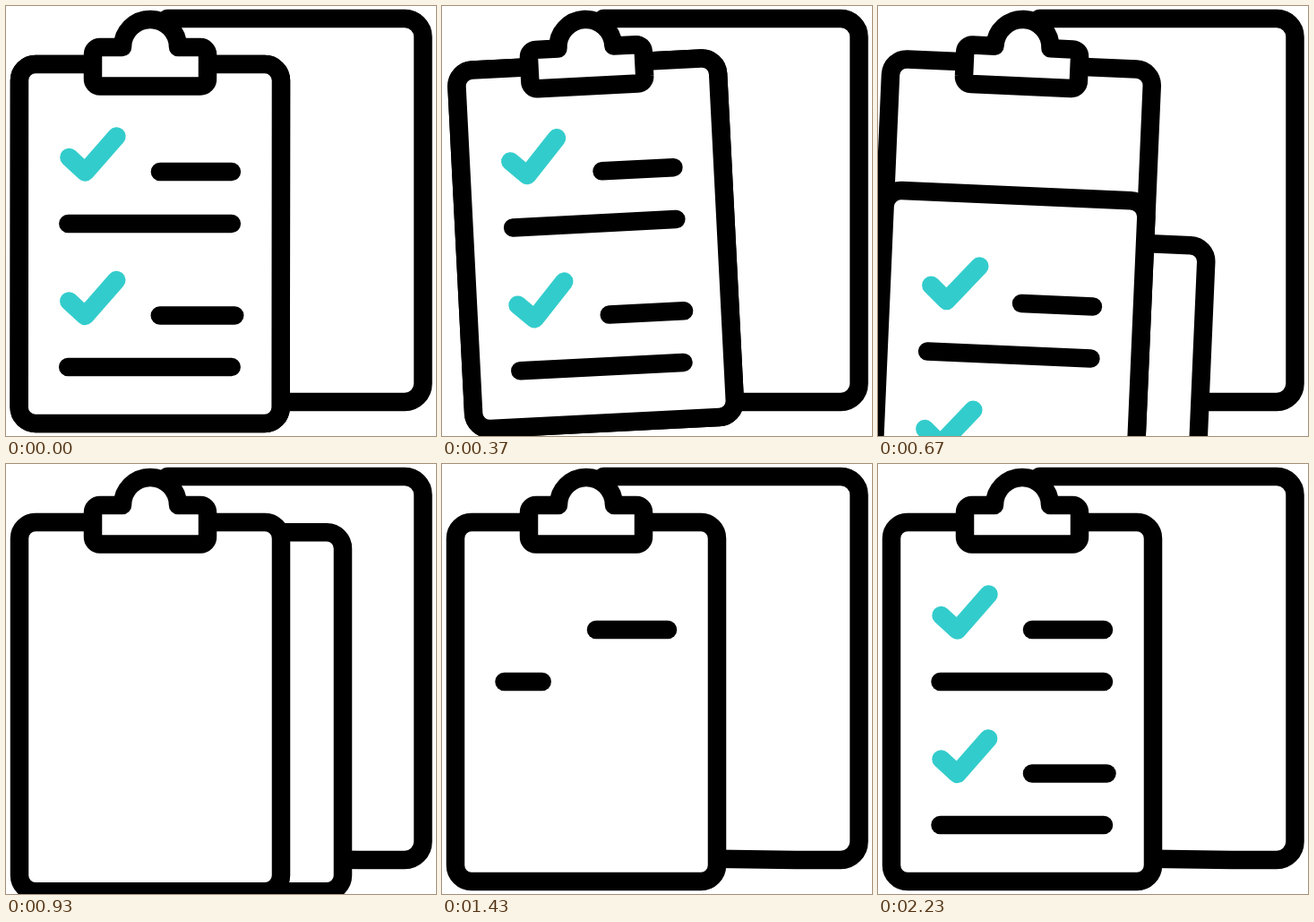
Animation of 480x480 px, one loop 2.5 s. Source, as an HTML page with a canvas:

```html
<!DOCTYPE html>
<html lang="en">
<head>
<meta charset="utf-8">
<title>Checklist</title>
<style>
  html, body { margin: 0; height: 100%; overflow: hidden; background: #fff; }
  canvas { display: block; width: 100vw; height: 100vh; }
</style>
</head>
<body>
<canvas id="stage" width="480" height="480"></canvas>
<script>
const ctx = document.getElementById('stage').getContext('2d');
const LOOP = 2500, SWING_END = 930, WRITE_START = 1225, WRITE_STEP = 172, WRITE_TIME = 147;
const PIVOT = { x: 161, y: 57 };
const PAGE = { x: 15, y: 65, w: 292, h: 401 };
const BLACK = '#000', TEAL = '#33cccc';

// Written in this order, each as a flat list of points.
const marks = [
  { color: BLACK, points: [172, 185, 252, 185] },
  { color: BLACK, points: [69.5, 243, 252, 243] },
  { color: BLACK, points: [172, 345.5, 255.5, 345.5] },
  { color: BLACK, points: [69.5, 403, 252, 403] },
  { color: TEAL, points: [70.5, 169, 88.5, 185.5, 123.5, 145.5] },
  { color: TEAL, points: [70.5, 329.5, 88.5, 346, 123.5, 306] }
];
const clipShape = new Path2D(
  'M105 46H130A31 31 0 0 1 192 46H217A8 8 0 0 1 225 54V81A8 8 0 0 1 217 89.5' +
  'H105A8 8 0 0 1 97 81V54A8 8 0 0 1 105 46Z');

const clamp = v => Math.min(1, Math.max(0, v));
const progress = (t, from, to) => clamp((t - from) / (to - from));
const smooth = p => p * p * (3 - 2 * p);

function along(t, keys) {
  let value = keys[0][1];
  for (let i = 1; i < keys.length; i++) {
    const [t0, v0] = keys[i - 1], [t1, v1] = keys[i];
    if (t >= t0) value = v0 + (v1 - v0) * progress(t, t0, t1);
  }
  return value;
}

function outline(path) {
  ctx.fillStyle = '#fff';
  ctx.strokeStyle = BLACK;
  ctx.fill(path);
  ctx.stroke(path);
}

function page(dx, dy, height) {
  const path = new Path2D();
  path.roundRect(PAGE.x + dx, PAGE.y + dy, PAGE.w, height, Math.min(18, height / 2));
  outline(path);
}

function drawMark({ color, points }, part) {
  if (part <= 0) return;
  let length = 0;
  ctx.beginPath();
  ctx.moveTo(points[0], points[1]);
  for (let i = 2; i < points.length; i += 2) {
    ctx.lineTo(points[i], points[i + 1]);
    length += Math.hypot(points[i] - points[i - 2], points[i + 1] - points[i - 1]);
  }
  ctx.strokeStyle = color;
  if (part < 1) ctx.setLineDash([length * part, 999]);
  ctx.stroke();
  ctx.setLineDash([]);
}

function drawBackBoard(t) {
  const endY = along(t, [[0, 442], [400, 442], [500, 447], [670, 442], [930, 440.7]]);
  ctx.strokeStyle = BLACK;
  ctx.stroke(new Path2D(
    `M180 14H445A20.5 20.5 0 0 1 465.5 34.5V421.5A20.5 20.5 0 0 1 445 442H395L307 ${endY}`));
}

function draw(t) {
  const angle = t < SWING_END ? 5.05 * Math.sin(2 * Math.PI * t / 620) : 0;
  const fall = 21 * (Math.max(0, t - 396) / 104) ** 2;   // old page dropping out
  const rise = Math.max(0, 0.702 * (947 - t));           // distance left for the new page
  const stretch = Math.min(fall, rise);
  const aside = 69 * smooth(progress(t, 370, 450)) * (1 - smooth(progress(t, 1067, 1250)));
  const newHeight = PAGE.h + stretch - rise;

  ctx.clearRect(0, 0, 480, 480);
  ctx.lineWidth = 20.5;
  ctx.lineCap = ctx.lineJoin = 'round';
  drawBackBoard(t);

  ctx.save();
  ctx.translate(PIVOT.x, PIVOT.y);
  ctx.rotate(angle * Math.PI / 180);
  ctx.translate(-PIVOT.x, -PIVOT.y);
  if (newHeight > 0 && aside > 0) page(aside, rise, newHeight);
  page(0, 0, PAGE.h + stretch);

  if (t < SWING_END) {
    ctx.save();
    ctx.translate(0, fall);
    page(0, 0, PAGE.h);
    marks.forEach(mark => drawMark(mark, 1));
    ctx.restore();
  } else {
    marks.forEach((mark, i) => {
      const start = WRITE_START + i * WRITE_STEP;
      drawMark(mark, progress(t, start, start + WRITE_TIME));
    });
  }
  outline(clipShape);
  ctx.restore();
}

const begin = performance.now();
function tick() {
  draw((performance.now() - begin) % LOOP);
  requestAnimationFrame(tick);
}
tick();
</script>
</body>
</html>
```
